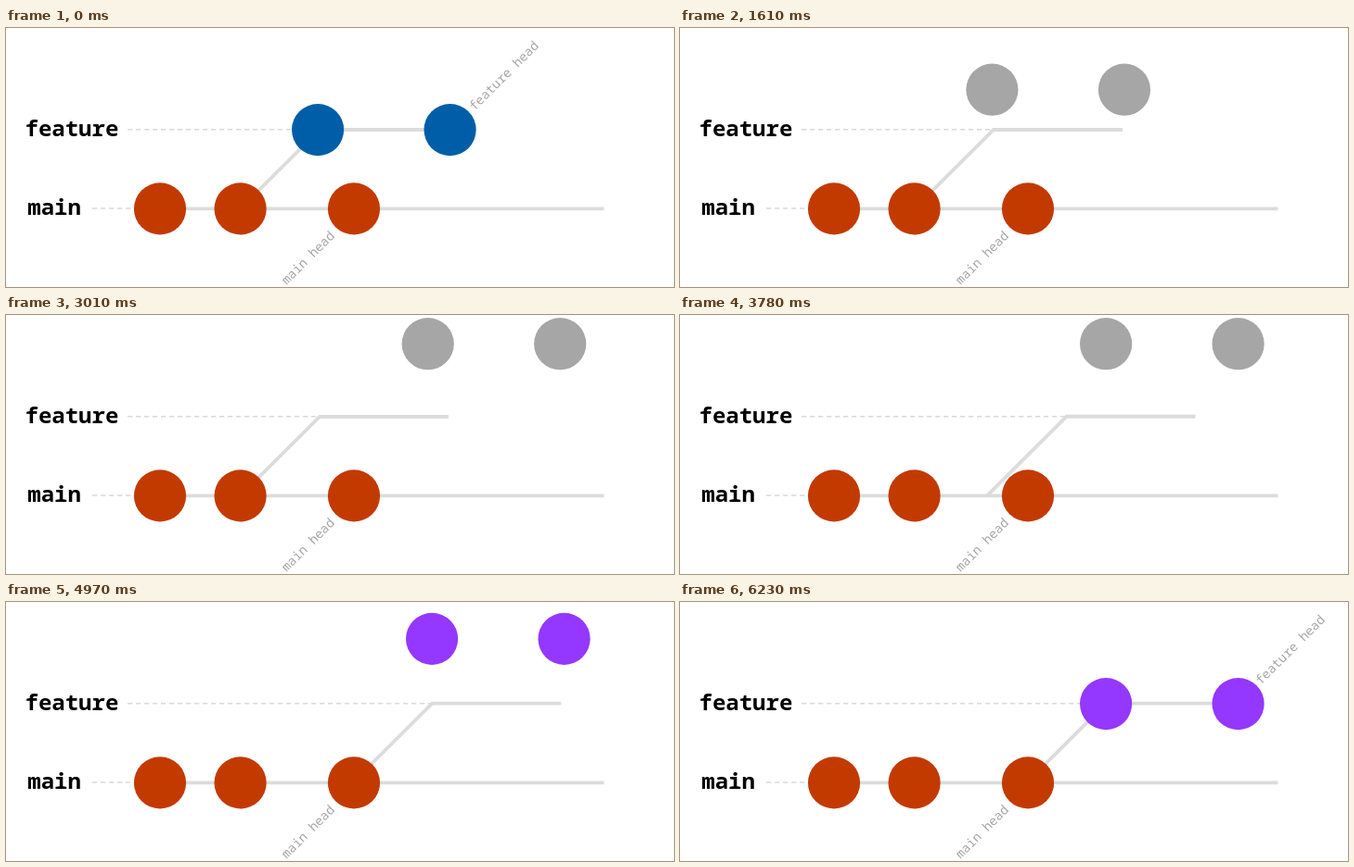
Write an HTML page that moves like this. It is 720 px wide and 280 px high and loops after 7 s.

```html
<!DOCTYPE html>
<html lang="en">
<head>
<meta charset="utf-8">
<title>Rebasing a feature branch</title>
<style>
  html, body { margin: 0; width: 100%; height: 100%; overflow: hidden; background: #fff; }
  svg { display: block; width: 720px; height: 280px; }
  text { font-family: "Noto Sans Mono", "DejaVu Sans Mono", monospace; }
  .label { font-size: 24px; font-weight: 700; }
  .head { font-size: 13.75px; font-weight: 500; fill: #a6a6a6; }
  .line { fill: none; stroke: #dcdcdc; stroke-width: 3.8; }
  .dash { stroke: #d9d9d9; stroke-width: 1.5; stroke-dasharray: 5.3 3.7; }
  .main { fill: #c33a00; }
</style>
</head>
<body>
<svg viewBox="0 0 720 280">
  <path class="dash" d="M131 109.8H459M93 195H138"/>
  <path class="line" d="M166 195.4H644.5"/>
  <path class="line" id="branch" d="M252.8 195.2L338 110H477"/>
  <g class="main">
    <circle cx="166" cy="195.4" r="28.1"/>
    <circle cx="252.6" cy="195.4" r="28.1"/>
    <circle cx="375" cy="195.4" r="28.1"/>
  </g>
  <g id="commits">
    <circle r="28.1"/>
    <circle cx="142.5" r="28.1"/>
  </g>
  <text class="label" x="20.5" y="116.5">feature</text>
  <text class="label" x="23.3" y="202">main</text>
  <text class="head" transform="translate(302.5 278) rotate(-45)">main head</text>
  <text class="head" id="featureHead">feature head</text>
</svg>
<script>
  const LOOP = 7000, STEP = 70;
  const BLUE = [0, 94, 168], GRAY = [166, 166, 166], PURPLE = [148, 55, 255];
  const [branch, commits, featureHead] =
    ["branch", "commits", "featureHead"].map(id => document.getElementById(id));

  const progress = (t, start, length) => Math.min(1, Math.max(0, (t - start) / length));
  const ease = (t, start) => (1 - Math.cos(Math.PI * progress(t, start, 1000))) / 2;
  const mix = (a, b, p) => a.map((v, i) => Math.round(v + (b[i] - v) * p));
  const move = (element, x, y, extra = "") =>
    element.setAttribute("transform", `translate(${x} ${y}) ${extra}`);

  function draw(t) {
    const lift = ease(t, 1078), across = ease(t, 2131);
    const slide = ease(t, 3184), drop = ease(t, 4755);
    const fade = progress(t, 525, 500), tint = progress(t, 4222, 500);

    move(commits, 336.1 + 0.6 * lift + 122.4 * across, 110.1 - 78.9 * (lift - drop));
    commits.setAttribute("fill", `rgb(${mix(mix(BLUE, GRAY, fade), PURPLE, tint)})`);
    move(branch, 121.3 * slide, -0.4 * slide);

    // The head label leaves smoothly and returns in three steps beside the last commit.
    const returning = t >= 5810;
    move(featureHead, returning ? 626 : 505, 90, "rotate(-45)");
    featureHead.setAttribute("opacity",
      returning ? Math.min(3, Math.floor((t - 5810) / 140)) / 3 : 1 - fade);
  }

  const begin = performance.now();
  function tick() {
    const t = (performance.now() - begin) % LOOP;
    draw(Math.floor(t / STEP) * STEP);
    requestAnimationFrame(tick);
  }
  tick();
</script>
</body>
</html>
```
